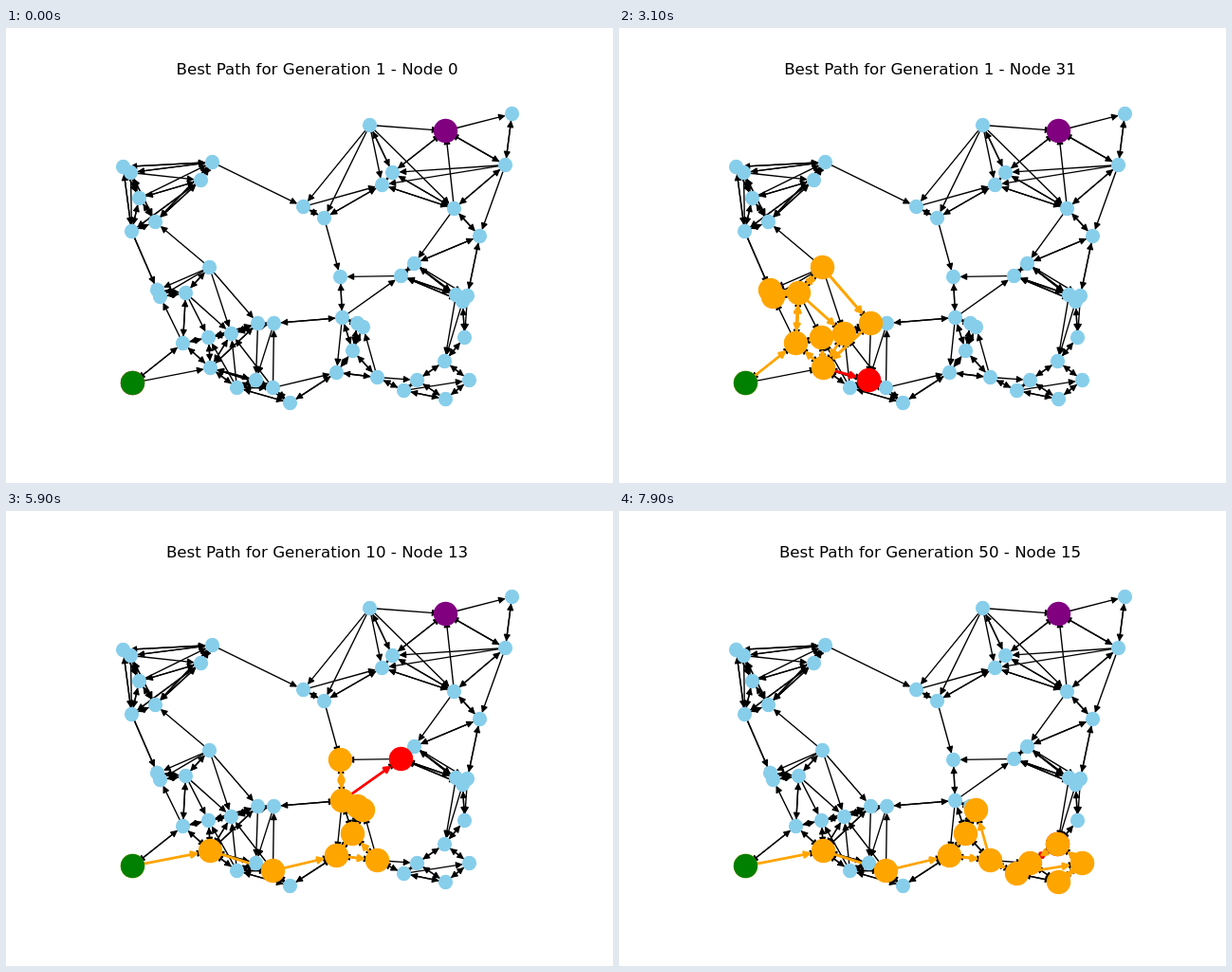
Recreate the animation shown at these times as an HTML page with a canvas. Size 640x480 px, loop 8 s.

```html
<!DOCTYPE html>
<html lang="en">
<head>
<meta charset="utf-8">
<title>Best path</title>
<style>
html, body { margin: 0; width: 100%; height: 100%; overflow: hidden; background: #fff; }
canvas { display: block; }
</style>
</head>
<body>
<canvas id="stage" width="640" height="480"></canvas>
<script>
const ctx = document.getElementById('stage').getContext('2d');
const PT = 100 / 72; // pixels per point

const nodes = [
  [133, 374], [463, 108], [533, 90], [526, 144], [383, 102],
  [407, 152], [396, 165], [472, 190], [499, 219], [313, 188],
  [335, 200], [352, 262], [416, 261], [430, 248], [474, 281],
  [486, 282], [481, 288], [483, 326], [462, 351], [488, 371],
  [463, 391], [433, 371], [419, 382], [391, 368], [376, 315],
  [370, 311], [365, 340], [348, 363], [354, 305], [282, 311],
  [265, 311], [237, 322], [213, 326], [215, 358], [186, 332],
  [189, 279], [214, 252], [159, 276], [162, 283], [132, 214],
  [157, 204], [140, 179], [131, 152], [123, 146], [217, 141],
  [205, 160], [243, 379], [263, 371], [281, 379], [299, 395]
];
const START = 0, GOAL = 1;

// Longer links; nodes closer than NEAR are always joined both ways.
const NEAR = 40;
const twoWay = {
  0: [34], 1: [3, 5], 2: [3], 3: [7], 4: [5], 5: [7], 6: [7, 10],
  8: [13, 15], 11: [28], 12: [14, 16], 13: [14, 16], 20: [22], 23: [27],
  27: [49], 28: [29], 29: [31], 30: [32, 33], 31: [33], 33: [47, 48],
  34: [35], 39: [43, 45], 40: [42, 44, 45], 41: [45], 42: [44], 43: [44],
  46: [49], 47: [49]
};
const oneWay = {
  0: [33], 1: [2], 3: [5, 6, 8], 4: [1, 6, 7, 9, 10], 7: [1, 13], 9: [6],
  10: [11], 12: [11], 13: [15], 14: [18], 15: [17], 16: [18], 22: [19],
  23: [21, 24], 28: [12, 27], 29: [47], 30: [47], 34: [38], 35: [31, 32],
  36: [30, 31, 37, 38, 40], 39: [37, 38], 41: [44], 42: [39, 45], 44: [9],
  46: [31, 32], 48: [27, 29, 31]
};

const runs = [
  { generation: 1, from: 0, path: [
    0, 34, 35, 38, 35, 36, 30, 33, 32, 34, 35, 36, 30, 33, 34, 35,
    38, 35, 37, 35, 38, 35, 37, 38, 35, 36, 35, 34, 35, 31, 33, 47,
    46, 47, 48, 29, 30, 32, 31, 29, 28, 12, 13, 8, 7, 1] },
  { generation: 10, from: 46, path: [
    0, 33, 48, 27, 23, 26, 27, 26, 24, 25, 28, 11, 28, 12, 13, 8, 7, 1] },
  { generation: 50, from: 64, path: [
    0, 33, 48, 27, 23, 24, 26, 27, 23, 22, 19, 20, 19, 18, 21, 18] }
];

const distance = (a, b) =>
  Math.hypot(nodes[a][0] - nodes[b][0], nodes[a][1] - nodes[b][1]);

function buildLinks() {
  const links = [];
  const add = (table, both) => {
    for (const a in table) for (const b of table[a]) {
      links.push([+a, b]);
      if (both) links.push([b, +a]);
    }
  };
  add(twoWay, true);
  add(oneWay, false);
  nodes.forEach((_, a) => nodes.forEach((_, b) => {
    if (a !== b && distance(a, b) < NEAR) links.push([a, b]);
  }));
  return links;
}
const links = buildLinks();

// Arrow from a to b, cut off at the rims of nodes with the given area.
function arrow(a, b, color, width, area) {
  const gap = Math.sqrt(area) / 2 * PT;
  const length = distance(a, b);
  if (length < 2 * gap) return;
  const [x, y] = nodes[a];
  const tip = length - gap - width * PT * Math.sqrt(5) / 2;
  const base = tip - 4 * PT, half = 2 * PT;
  ctx.save();
  ctx.translate(x, y);
  ctx.rotate(Math.atan2(nodes[b][1] - y, nodes[b][0] - x));
  ctx.strokeStyle = ctx.fillStyle = color;
  ctx.lineWidth = width * PT;
  ctx.lineCap = ctx.lineJoin = 'round';
  ctx.beginPath();
  ctx.moveTo(gap, 0);
  ctx.lineTo(tip, 0);
  ctx.stroke();
  ctx.beginPath();
  ctx.moveTo(base, -half);
  ctx.lineTo(tip, 0);
  ctx.lineTo(base, half);
  ctx.closePath();
  ctx.fill();
  ctx.stroke();
  ctx.restore();
}

function dot(n, color, area) {
  ctx.fillStyle = color;
  ctx.beginPath();
  ctx.arc(...nodes[n], (Math.sqrt(area) + 1) / 2 * PT, 0, 2 * Math.PI);
  ctx.fill();
}

function draw(tick) {
  const run = runs.findLast(r => tick >= r.from);
  const step = tick - run.from;
  const path = run.path;

  ctx.fillStyle = '#fff';
  ctx.fillRect(0, 0, 640, 480);
  ctx.fillStyle = '#000';
  ctx.font = `${12 * PT}px "DejaVu Sans", sans-serif`;
  ctx.textAlign = 'center';
  ctx.fillText(`Best Path for Generation ${run.generation} - Node ${step}`, 328, 49);

  ctx.save();
  ctx.translate(0.5, 0.5);
  for (const [a, b] of links) arrow(a, b, '#000', 1, 100);
  if (step) arrow(path[step - 1], path[step], 'red', 2, 300);
  for (let i = 1; i < step; i++) arrow(path[i - 1], path[i], 'orange', 2, 300);

  nodes.forEach((_, n) => dot(n, 'skyblue', 100));
  dot(path[step], 'red', 300);
  new Set(path.slice(0, step)).forEach(n => dot(n, 'orange', 300));
  dot(START, 'green', 300);
  dot(GOAL, 'purple', 300);
  ctx.restore();
}

const began = performance.now();
function frame() {
  draw(Math.floor((performance.now() - began) % 8000 / 100));
  requestAnimationFrame(frame);
}
frame();
</script>
</body>
</html>
```
